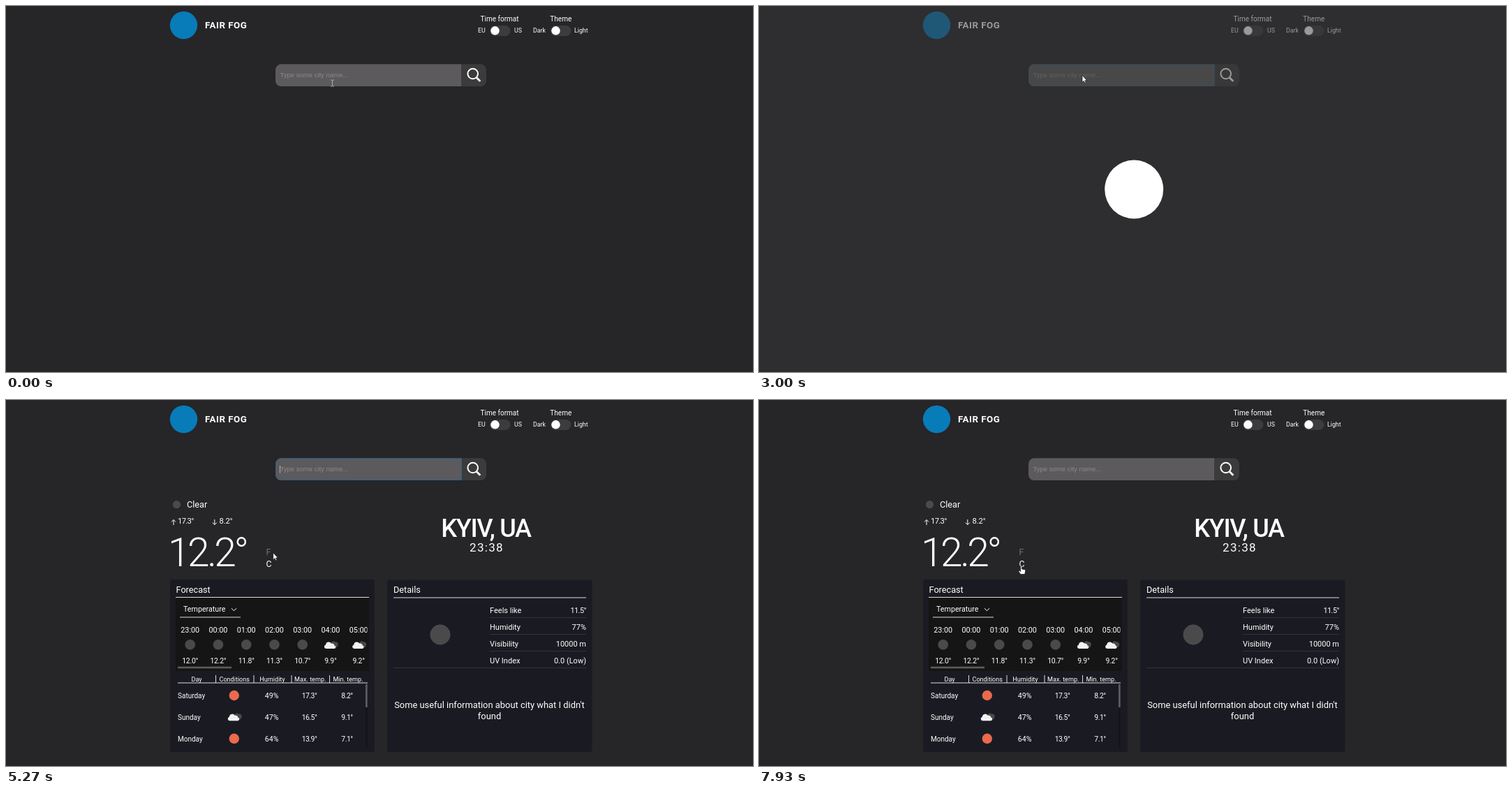
Write an HTML page that moves like this. It is 1070 px wide and 524 px high and loops after 8 s.

```html
<!DOCTYPE html>
<html lang="en">
<head>
<meta charset="utf-8">
<title>Weather</title>
<style>
html, body { margin: 0; width: 100%; height: 100%; overflow: hidden; background: #262528; }
svg { display: block; width: 1070px; height: 524px; }
text { font-family: Roboto, sans-serif; fill: #fff; white-space: pre; }
.field { font-family: "Liberation Sans", Arial, sans-serif; font-size: 9.5px; }
</style>
</head>
<body>
<svg id="stage" viewBox="0 0 1070 524" xmlns="http://www.w3.org/2000/svg"></svg>
<script>
const LOOP = 8000;
const stage = document.getElementById('stage');

const text = (x, y, size, str, attrs = '') =>
  `<text x="${x}" y="${y}" font-size="${size}" ${attrs}>${str}</text>`;
const rect = (x, y, w, h, fill, r = 0) =>
  `<rect x="${x}" y="${y}" width="${w}" height="${h}" rx="${r}" fill="${fill}"/>`;
const circle = (x, y, r, fill, attrs = '') =>
  `<circle cx="${x}" cy="${y}" r="${r}" fill="${fill}" ${attrs}/>`;
const path = (d, stroke = '#fff', width = 1, attrs = '') =>
  `<path d="${d}" fill="none" stroke="${stroke}" stroke-width="${width}" ${attrs}/>`;
const MID = 'text-anchor="middle"', END = 'text-anchor="end"', TIGHT = 'letter-spacing="-.5"';
const temp = (x, y, size, celsius, attrs = '') =>
  text(x, y, size, '', `${attrs} data-celsius="${celsius}"`);

const toggle = x => rect(x, 28, 29.5, 15, '#3c3b3d', 7.5) + circle(x + 7.5, 35.3, 6.2, '#fff');
const sun = (x, y) => circle(x, y, 7.2, '#ea6a4e');
const moon = (x, y, r) => circle(x, y, r, '#4a4a4b', 'stroke="#555" stroke-width=".5"');
const cloud = (x, y) => `<g transform="translate(${x} ${y})">
  <path d="M0-2a4 4 0 0 1 6.500-2.500a3.600 3.600 0 0 1 3.500 6q0 2-3 2z" fill="#48484b"/>
  <path d="M-6.500 5.300a2.800 2.800 0 0 1-.5-5.500a4.300 4.300 0 0 1 8-2a3.500 3.500 0 0 1 4.500 2.800a2.400 2.400 0 0 1 0 4.700z" fill="#f2f2f2"/></g>`;

const header = () =>
  circle(254.5, 27.5, 19.7, '#087bb9') +
  text(285, 32, 13.3, 'FAIR FOG', 'font-weight="700" letter-spacing=".5"') +
  text(707, 21.5, 10, 'Time format', MID) + text(794.8, 21.5, 10, 'Theme', MID) +
  text(676, 38.3, 8.8, 'EU') + toggle(693) + text(728, 38.3, 8.8, 'US') +
  text(755, 38.3, 8.8, 'Dark') + toggle(780) + text(814, 38.3, 8.8, 'Light');

const search = () =>
  `<path d="M652.500 83.300H394a8 8 0 0 0-8 8V107a8 8 0 0 0 8 8H652.500z" fill="#5c5a5d"/>
   <path d="M652.500 83.300H680a8 8 0 0 1 8 8V107a8 8 0 0 1-8 8H652.500z" fill="#3b3b3c"/>` +
  path('M652.500 83.800H394a7.500 7.500 0 0 0-7.500 7.500V107a7.500 7.500 0 0 0 7.500 7.500H652.500z', '#2a6488', 1, 'id="focus"') +
  circle(668.7, 97, 7.3, 'none', 'stroke="#fff" stroke-width="2"') +
  path('M674 102.500L679.300 107.700', '#fff', 2.8) +
  '<text class="field" id="entry" x="392.5" y="102"></text>' +
  path('M0 94V104.500', '#c4c4c4', .8, 'id="caret"');

const current = () =>
  text(259, 154, 12.7, 'Clear') +
  path('M240 179V171.500M237 174.500L240 171.500L243 174.500M298.800 171V178.500M295.800 175.500L298.800 178.500L301.800 175.500') +
  temp(246, 177, 11.3, 17.3, 'letter-spacing="-.7"') + temp(305.5, 177, 11.3, 8.2, 'letter-spacing="-.2"') +
  temp(232, 238, 57, 12.2, 'font-weight="300" letter-spacing="-3.5"') +
  text(372.5, 221.5, 12.3, 'F', 'id="unitF"') + text(372.5, 239.2, 12.3, 'C', 'id="unitC"') +
  text(687.5, 195.6, 36, 'KYIV, UA', MID + ' font-weight="500" letter-spacing="-1.2"') +
  text(688.5, 217, 17, '23:38', MID + ' letter-spacing="1.3"');

const hourly = () => [12.0, 12.2, 11.8, 11.3, 10.7, 9.9, 9.2].map((c, i) => {
  const x = 263.7 + i * 40.25;
  const hour = String((23 + i) % 24).padStart(2, '0') + ':00';
  return text(x, 332.5, 10.8, hour, MID) + temp(x, 377, 10.4, c, MID + ' letter-spacing="-.2"') +
    (i < 5 ? '' : cloud(x, 350.8));
}).join('');

const daily = () => [
  ['Saturday', 49, 17.3, 8.2, sun],
  ['Sunday', 47, 16.5, 9.1, cloud],
  ['Monday', 64, 13.9, 7.1, sun],
].map(([day, humidity, max, min, icon], i) => {
  const y = 427.3 + i * 30.9;
  return text(246, y, 10, day) + icon(326.8, y - 4.3) + text(380.7, y, 10.6, humidity + '%', MID) +
    temp(434.5, y, 10.4, max, `${MID} ${TIGHT}`) + temp(488.5, y, 10.4, min, `${MID} ${TIGHT}`);
}).join('');

const forecast = () =>
  rect(235, 257, 293, 247, '#1a1b22', 3) + text(243.5, 275.5, 12.7, 'Forecast') +
  rect(243, 283, 277, 105, '#151516') + path('M243 282.500H520M249 311H336', '#ddd') +
  text(254, 303, 10.7, 'Temperature') + path('M323 298.200L326.500 301.800L330 298.200') +
  `<g clip-path="url(#hours)">${hourly()}</g>` +
  rect(246, 381.7, 77, 2.6, '#5c5c5f') +
  ['Day', 'Conditions', 'Humidity', 'Max. temp.', 'Min. temp.']
    .map((label, i) => text(273 + i * 54.25, 402.5, 9.1, label, MID)).join('') +
  path('M246 405H518M300.500 394V405M355 394V405M409 394V405M463.500 394V405', '#ddd') +
  daily() + rect(515, 407, 2.7, 91, '#141519') + rect(515, 407, 2.7, 33, '#5c5c62');

const details = () =>
  rect(546, 257.5, 293.5, 246.5, '#1a1b22', 3) + text(555, 276.3, 12.7, 'Details') +
  path('M555 283H831', '#ddd') + path('M693 311.500H831M693 335.500H831M693 359.500H831M555 383.500H831', '#33343b') +
  ['Feels like', 'Humidity', 'Visibility', 'UV Index']
    .map((label, i) => text(693, 304.7 + i * 24.1, 11, label)).join('') +
  temp(831, 304.7, 10.8, 11.5, `${END} ${TIGHT}`) +
  ['77%', '10000 m', '0.0 (Low)'].map((v, i) => text(831, 328.8 + i * 24.1, 11, v, END)).join('') +
  text(692.5, 441, 12.9, "Some useful information about city what I didn't", MID) +
  text(692.5, 457, 12.9, 'found', MID);

const moons = () => moon(244.5, 149.7, 5.3) + moon(622, 336, 14.2) +
  [0, 1, 2, 3, 4].map(i => moon(263.7 + i * 40.25, 350.3, 7)).join('');

const cursors = () => `
  <g id="ibeam">${path('M-2.500-4.500H-.5L0-4L.5-4.500H2.500M0-4V4M-2.500 4.500H-.5L0 4L.5 4.500H2.500', '#b5b5b5', .9)}</g>
  <g id="arrow"><path d="M0 0V10L2.300 8L3.800 11.200L5.300 10.500L3.900 7.400H6.800z" fill="#fff" stroke="#111" stroke-width=".7"/></g>
  <g id="hand"><path d="M-1.100 1a1 1 0 0 1 2 0V5L4.600 5.700Q6 6 6 7.500L5 12.500H-1L-3.800 8.500Q-4 7-2.600 7.300L-1.100 8.500z" fill="#fff" stroke="#111" stroke-width=".7"/></g>`;

stage.innerHTML = `<clipPath id="hours"><rect x="243" y="283" width="274.500" height="105"/></clipPath>` +
  header() + search() +
  `<g id="weather">${current()}${forecast()}${details()}</g><g id="moons">${moons()}</g>
   <g id="loader">${rect(0, 0, 1070, 524, 'rgba(54,54,55,.5)')}${circle(537.2, 262.5, 42, '#fff')}</g>` + cursors();

const part = Object.fromEntries([...stage.querySelectorAll('[id]')].map(el => [el.id, el]));
const temps = [...stage.querySelectorAll('[data-celsius]')];

// Each table holds [start time, value] rows.
const PLACEHOLDER = 'Type some city name...';
const typed = [[0, ''], [1330, 'K'], [1730, 'Ky'], [1930, 'Kyi'], [2070, 'Kyiv'], [2530, '']];
const caretOn = [[0, 0], [530, 1], [1070, 0], [1330, 1], [2600, 0], [3130, 1], [3670, 0],
  [4200, 1], [4730, 0], [5270, 1], [5800, 0]];
const focus = [[0, 0], [530, 0], [730, 1], [5800, 1], [6000, 0]];
const pointerX = [[0, 467.5], [70, 467.5], [330, 464], [4400, 464], [4670, 428], [4730, 428],
  [5200, 384], [5530, 378], [6600, 378], [6930, 375.7]];
const pointerY = [[0, 110.5], [70, 110.5], [330, 99.3], [4400, 99.3], [4670, 218], [4730, 218],
  [5200, 219], [5530, 217.5], [6070, 217.5], [6600, 229], [6930, 237]];

const hold = (table, t) => table.findLast(([start]) => start <= t)[1];
function tween(table, t) {
  const next = table.findIndex(([start]) => start > t);
  if (next < 0) return table[table.length - 1][1];
  const [t0, a] = table[next - 1], [t1, b] = table[next];
  return a + (b - a) * (t - t0) / (t1 - t0);
}
const show = (el, on) => { el.style.display = on ? '' : 'none'; };

let unit = '';
function setUnit(next) {
  if (next === unit) return;
  unit = next;
  for (const el of temps) {
    const c = Number(el.dataset.celsius);
    el.textContent = (unit === 'F' ? c * 1.8 + 32 : c).toFixed(1) + '°';
  }
  part.unitF.style.fill = unit === 'F' ? '#fff' : '#717074';
  part.unitC.style.fill = unit === 'C' ? '#fff' : '#717074';
}

function render(t) {
  const entry = hold(typed, t);
  part.entry.textContent = entry || PLACEHOLDER;
  part.entry.style.fill = entry ? '#d2d0d2' : '#8b898c';
  part.focus.style.opacity = tween(focus, t);
  show(part.caret, hold(caretOn, t));
  const caretX = 392.5 + (entry ? part.entry.getComputedTextLength() : 0);
  part.caret.setAttribute('transform', `translate(${caretX} 0)`);

  const loading = t >= 2870 && t < 3070;
  show(part.loader, loading);
  show(part.weather, t >= 3070);
  show(part.moons, t >= 3270);
  setUnit(t >= 6070 && t < 7930 ? 'F' : 'C');

  const x = tween(pointerX, t), y = tween(pointerY, t);
  const shape = loading || (y > 115 && x > 382) ? 'arrow' : y > 115 ? 'hand' : 'ibeam';
  for (const id of ['ibeam', 'arrow', 'hand']) show(part[id], id === shape);
  part[shape].setAttribute('transform', `translate(${loading ? x - 1 : x} ${y})`);
}

const began = performance.now();
function tick() {
  render((performance.now() - began) % LOOP);
  requestAnimationFrame(tick);
}
tick();
</script>
</body>
</html>
```
